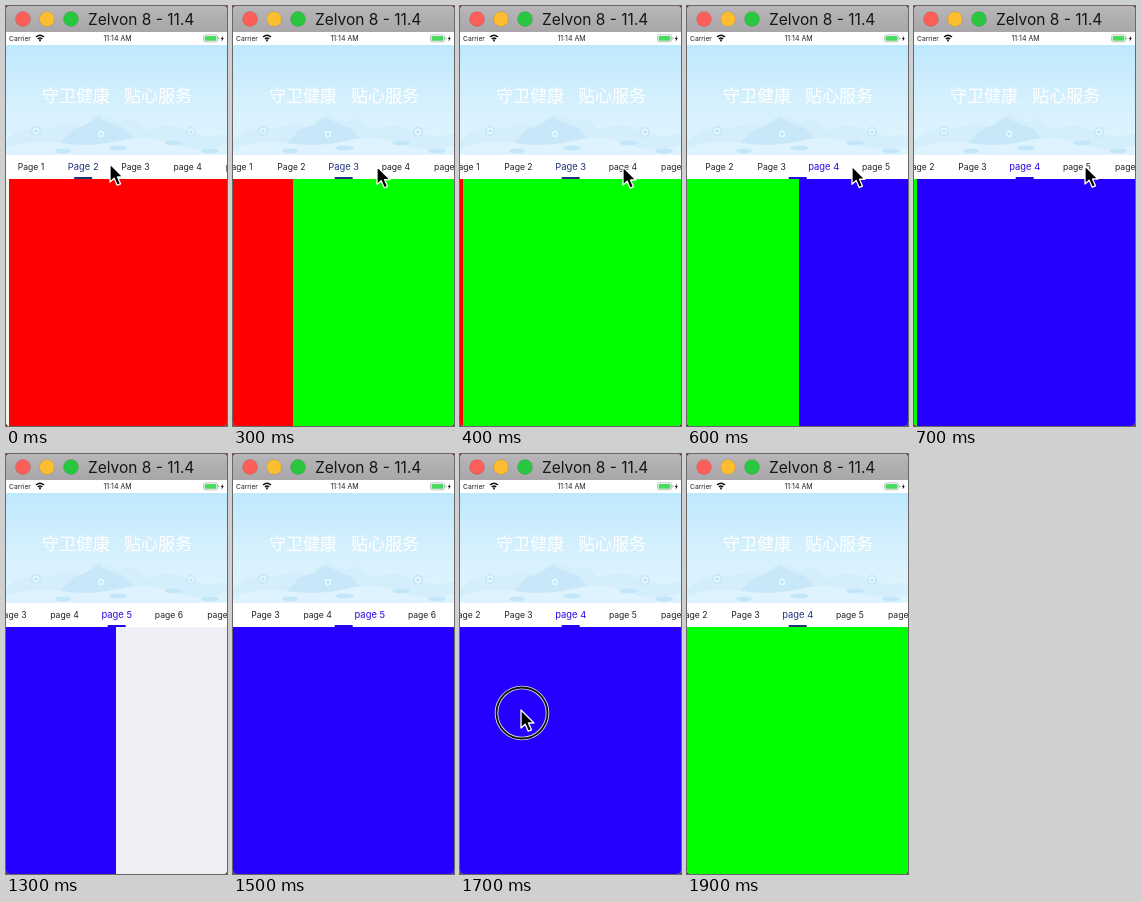
An HTML page that plays this animation: 221x420 px, repeating every 2000 ms.

```html
<!DOCTYPE html>
<html lang="en">
<head>
<meta charset="utf-8">
<title>Tab pager</title>
<style>
  html, body { margin: 0; width: 100%; height: 100%; overflow: hidden; background: #6b2c1c; }
  svg { display: block; width: 221px; height: 420px; font-family: Inter, "Open Sans", sans-serif; }
  #tabs text { font-size: 8.6px; text-anchor: middle; fill: #222; }
  #tabs text.on { font-size: 9.4px; fill: var(--accent); }
  #line { fill: var(--accent); }
  .slogan { font: 500 17px "Noto Sans CJK SC", "Noto Sans CJK", "Noto Serif", sans-serif; fill: #fff; }
</style>
</head>
<body>
<svg id="stage" viewBox="0 0 221 420">
  <defs>
    <linearGradient id="bar" x2="0" y2="1">
      <stop stop-color="#b8b6b8"/><stop offset="1" stop-color="#a8a6a8"/>
    </linearGradient>
    <linearGradient id="sky" x2="0" y2="1">
      <stop stop-color="#bee8fd"/><stop offset=".5" stop-color="#d5f0fd"/><stop offset="1" stop-color="#e2f5fe"/>
    </linearGradient>
    <clipPath id="window"><rect width="221" height="420" rx="4"/></clipPath>
    <clipPath id="banner"><rect y="39" width="221" height="110"/></clipPath>
    <g id="pin">
      <circle r="5" fill="#c3e6f9"/>
      <circle r="3.4" fill="#e6f6fe"/>
      <circle r="1.6" fill="#b9e2f8"/>
    </g>
  </defs>
  <g clip-path="url(#window)">
    <rect width="221" height="420" fill="#fff"/>
    <rect width="221" height="26" fill="url(#bar)"/>
    <g stroke="#0002" stroke-width=".7">
      <circle cx="17" cy="13" r="7.5" fill="#fc5f58"/>
      <circle cx="41" cy="13" r="7.5" fill="#fdbd30"/>
      <circle cx="65" cy="13" r="7.5" fill="#29c740"/>
    </g>
    <text x="82" y="19" font-size="15.5" fill="#151515">Zelvon 8 - 11.4</text>

    <g font-size="6.7" fill="#222">
      <text x="3" y="35">Carrier</text>
      <text x="111.5" y="35" text-anchor="middle" font-size="7">11:14 AM</text>
    </g>
    <g fill="none" stroke="#111" stroke-width="1.4">
      <path d="M30 31Q34 27.5 38 31M31.8 33Q34 31 36.2 33"/>
      <circle cx="34" cy="34.4" r=".4"/>
    </g>
    <rect x="197.5" y="28.8" width="14" height="7" rx="1.8" fill="#fff" stroke="#aaa" stroke-width=".7"/>
    <rect x="198.6" y="29.9" width="11.8" height="4.8" rx="1" fill="#48d95f"/>
    <path d="M212.8 31.3V33.3" stroke="#aaa"/>
    <path d="M216.8 29.8L214.8 33H216L215.6 35.4L217.8 32H216.5Z" fill="#111"/>

    <g clip-path="url(#banner)">
      <rect y="39" width="221" height="110" fill="url(#sky)"/>
      <path d="M0 134Q14 121 32 122T62 116L76 121L94 107L113 116L124 112L140 124Q160 115 178 124T221 128V149H0Z" fill="#d4eefc"/>
      <path d="M52 139L66 124L80 119L92 111L104 117L118 122L134 139Z" fill="#c8e8fa"/>
      <path d="M0 143Q25 132 54 137T112 135T168 138T221 139V149H0Z" fill="#def3fd"/>
      <g fill="#c4e6f9">
        <ellipse cx="57" cy="145" rx="8" ry="2.5"/>
        <ellipse cx="112" cy="142" rx="9" ry="2.5"/>
        <ellipse cx="168" cy="137" rx="9" ry="2.5"/>
        <ellipse cx="204" cy="145" rx="9" ry="2.5"/>
      </g>
      <use href="#pin" x="30" y="125"/>
      <use href="#pin" x="95" y="128"/>
      <use href="#pin" x="185" y="126"/>
      <text class="slogan" x="36" y="96">守卫健康</text>
      <text class="slogan" x="118" y="96">贴心服务</text>
    </g>

    <g id="pages"></g>
    <g id="tabs"></g>
    <rect id="line" y="171" width="18" height="2"/>
    <g id="cursor">
      <g id="ring" fill="none">
        <circle cx="1" cy="3" r="25.5" stroke="#ddd" stroke-width="3.6"/>
        <circle cx="1" cy="3" r="25.5" stroke="#111" stroke-width="1.8"/>
      </g>
      <path d="M0 0V18L4.2 14.2L7.2 21.2L10.5 19.8L7.5 13H13Z" fill="#000" stroke="#fff" stroke-width="1.3" stroke-linejoin="round"/>
    </g>
  </g>
</svg>
<script>
const LOOP = 2000, STEP = 100, WIDTH = 221, PITCH = 52.2, FIRST = 25, MIDDLE = 110.7;
const EDGE = 3 / WIDTH; // sliver of the previous page just before a slide settles
const colors = ['#f2f2f2', '#ff0000', '#00ff00', '#2600ff', '#eeeef4', '#eeeef4'];
const names = ['Page 1', 'Page 2', 'Page 3', 'page 4', 'page 5', 'page 6', 'page 7'];
const $ = id => document.getElementById(id);

function add(parent, tag, attrs, text = '') {
  const node = document.createElementNS(parent.namespaceURI, tag);
  for (const key in attrs) node.setAttribute(key, attrs[key]);
  node.textContent = text;
  return parent.appendChild(node);
}

colors.forEach((fill, i) =>
  add($('pages'), 'rect', { x: i * WIDTH, y: 173, width: WIDTH, height: 247, fill }));
const labels = names.map((name, i) =>
  add($('tabs'), 'text', { x: FIRST + i * PITCH, y: 164 }, name));

// Keys are [time, value]; values ease in and out between neighbours.
function track(keys, time) {
  const next = keys.findIndex(key => key[0] > time);
  if (next < 0) return keys[keys.length - 1][1];
  if (next === 0) return keys[0][1];
  const [t0, a] = keys[next - 1], [t1, b] = keys[next];
  const u = (time - t0) / (t1 - t0);
  return a + (b - a) * u * u * (3 - 2 * u);
}

const pagePath = [[0, 1 - EDGE], [100, 1], [400, 2 - EDGE], [500, 2], [700, 3 - EDGE], [800, 3],
  [1000, 4], [1100, 4], [1500, 3], [1700, 3], [1900, 2]];
const tabPath = [[0, 1], [100, 1], [300, 2], [500, 2], [700, 3], [800, 3],
  [1000, 4], [1400, 4], [1600, 3]];
const cursorX = [[0, 104], [200, 125], [400, 163], [600, 165], [700, 171], [800, 163],
  [1000, 123], [1200, 55], [1600, 58], [1700, 61]];
const cursorY = [[0, 158], [400, 161], [700, 160], [1000, 164], [1200, 255], [1700, 256]];

function render(time) {
  const page = track(pagePath, time), tab = track(tabPath, time);
  const scroll = Math.max(0, FIRST + PITCH * tab - MIDDLE);
  const blueShown = page > 2.02 && page < 3.98;
  $('stage').style.setProperty('--accent', blueShown ? '#2408e8' : '#20347c');
  $('pages').setAttribute('transform', `translate(${-Math.round(page * WIDTH)})`);
  $('tabs').setAttribute('transform', `translate(${-scroll})`);
  $('line').setAttribute('x', FIRST + PITCH * tab - scroll - 9);
  labels.forEach((label, i) => label.classList.toggle('on', i === Math.round(tab)));

  const shown = time < 1200 || (time >= 1600 && time < 1800);
  $('cursor').style.display = shown ? '' : 'none';
  $('ring').style.display = time >= 1600 ? '' : 'none';
  $('cursor').setAttribute('transform', `translate(${track(cursorX, time)} ${track(cursorY, time)})`);
}

const start = performance.now();
function tick(now) {
  const time = Math.max(0, now - start) % LOOP;
  render(Math.floor(time / STEP) * STEP);
  requestAnimationFrame(tick);
}
render(0);
requestAnimationFrame(tick);
</script>
</body>
</html>
```
